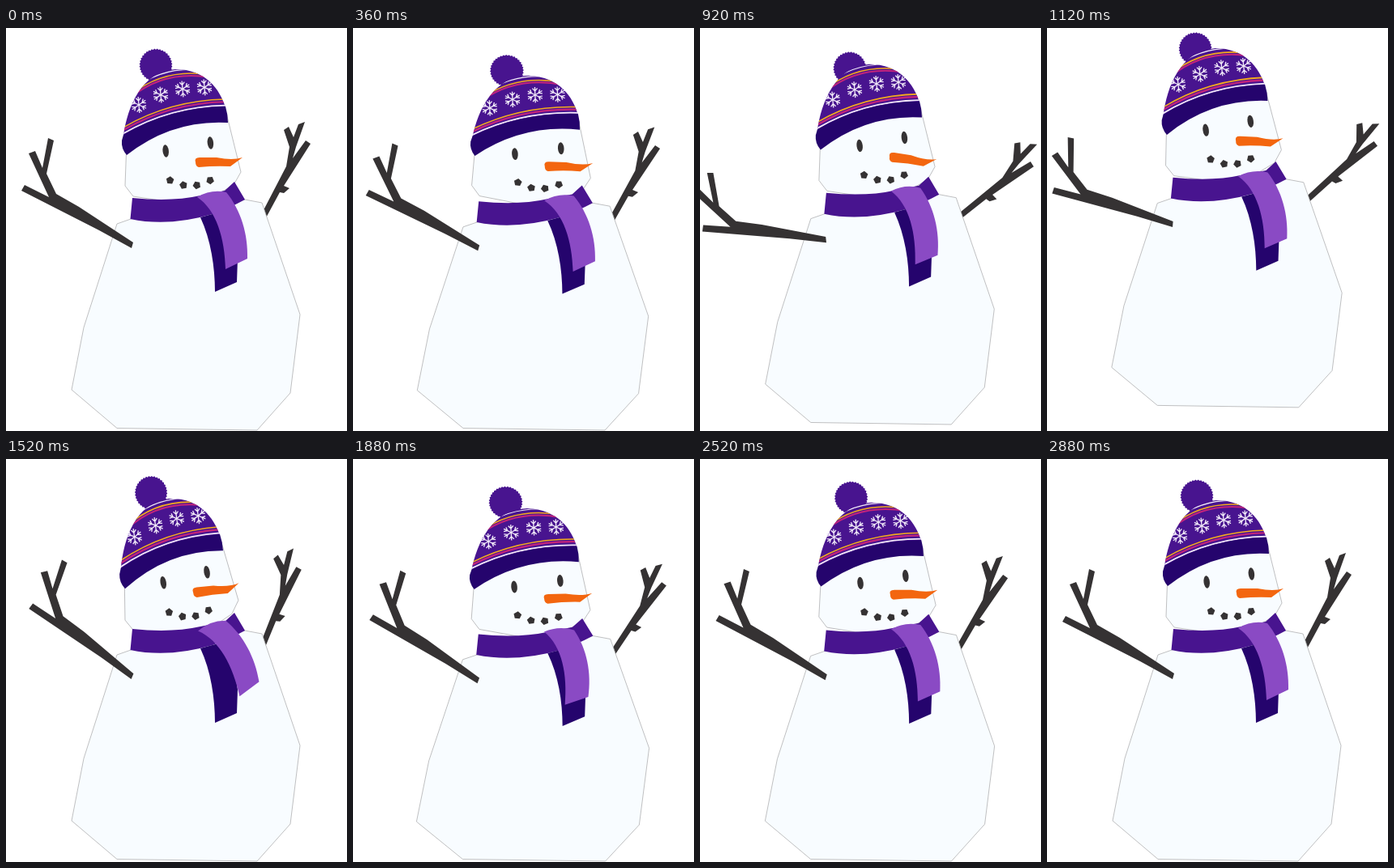
These frames come from a looping animation (421 by 498 pixels, 2920 ms). An HTML page with a canvas:

```html
<!DOCTYPE html>
<html lang="en">
<head>
<meta charset="utf-8">
<title>Jumping snowman</title>
<style>
html, body { margin: 0; width: 100%; height: 100%; overflow: hidden; background: #fff; }
canvas { display: block; width: 421px; height: 498px; }
</style>
</head>
<body>
<canvas id="stage"></canvas>
<script>
const W = 421, H = 498, LOOP = 2920, STEP = 40;
const TAKEOFF = 880, FLING = 980, LAND = 1520, REST = 2880;
const canvas = document.getElementById('stage');
const ctx = canvas.getContext('2d');
const dpr = window.devicePixelRatio || 1;
canvas.width = W * dpr;
canvas.height = H * dpr;

const SNOW = '#f8fcff', EDGE = '#b0b0b2', COAL = '#353233', CARROT = '#f3660f';
const PURPLE = '#48148f', DEEP = '#25046d', LILAC = '#8a4ac4';
const YELLOW = '#f6ab1c', PINK = '#c4247c', PALE = '#f3ecfa';

const ramp = (t, a, b) => Math.min(1, Math.max(0, (t - a) / (b - a)));
const ease = (t, a, b) => (1 - Math.cos(Math.PI * ramp(t, a, b))) / 2;

// Crouch, leap with the arms flung out, then a damped wobble after landing
function pose(t) {
  const crouch = ease(t, 0, 600) - ease(t, 760, TAKEOFF + 20);
  const v = ramp(t, TAKEOFF, LAND);
  const air = 4 * v * (1 - v);
  const fling = ease(t, 760, FLING);
  const back = ramp(t, FLING, LAND);

  const u = ramp(t, LAND, REST);
  const wave = Math.cos(Math.PI * (REST - LAND) * u / 360);
  const decay = Math.exp(-1.1 * u) * (1 - u ** 8);
  const swing = wave * decay;

  const lift = -30 * air;
  const stretch = 1 - .023 * crouch - .011 * air
    + decay * (.027 * u - .019 * (1 - wave));
  const squash = 1 - stretch;
  const tilt = 4.4 * crouch - 2.9 * ease(t, TAKEOFF, LAND) * swing;
  const left = -crouch + (34 * (1 - (1 - back) ** 2) - 27 * fling) * decay ** 2;
  return {
    lift, stretch, tilt, left,
    right: crouch + (28 * fling - 34 * back) * swing,
    tail: (4 * fling - 15 * ease(t, FLING, LAND)) * swing * decay,
    headY: 191 + lift * 1.03 + squash * 250,
    headStretch: 1 - tilt * .0075 - squash * .8,
    pom: -.45 * left,
    nose: -.4 * left - 100 * squash
  };
}

function fill(d, color) {
  ctx.fillStyle = color;
  ctx.fill(new Path2D(d));
}

function line(d, color, width) {
  ctx.strokeStyle = color;
  ctx.lineWidth = width;
  ctx.stroke(new Path2D(d));
}

// Draws around a pivot that has moved by dx, dy
function around(x, y, { dx = 0, dy = 0, deg = 0, sx = 1, sy = 1 }, draw) {
  ctx.save();
  ctx.translate(x + dx, y + dy);
  ctx.rotate(deg * Math.PI / 180);
  ctx.scale(sx, sy);
  ctx.translate(-x, -y);
  draw();
  ctx.restore();
}

function inBody(p, draw) {
  around(222, 496, { dy: p.lift, sx: 1 + (1 - p.stretch) * .8, sy: p.stretch }, draw);
}

function inHead(p, draw) {
  around(227.5, 191, {
    dx: p.tilt * .5, dy: p.headY - 191, deg: p.tilt,
    sx: 1 + (1 - p.headStretch) * .65, sy: p.headStretch
  }, draw);
}

function snow(d) {
  fill(d, SNOW);
  line(d, EDGE, .8);
}

function polygon(x, y, n, radius, start) {
  ctx.beginPath();
  for (let i = 0; i < n; i++) {
    const a = start + i * 2 * Math.PI / n, r = radius(i);
    ctx.lineTo(x + r * Math.cos(a), y + r * Math.sin(a));
  }
  ctx.closePath();
  ctx.fill();
}

function rightArm() {
  fill('M305 250L346 171L350 147L343 126L349 122L355 135L361 119L369 116L358 147L354 161L370 139L376 143L343 195L350 198L343 204L338 203L311 253Z', COAL);
}

function leftArm() {
  fill('M157 265L155 272L115 250L19 201L23 194L53 209L28 155L36 152L45 173L52 136L59 139L50 180L62 205L90 221Z', COAL);
}

function scarf(p) {
  fill('M156 210Q205 215 240 207L270 201L282 190L295 212Q275 223 255 230Q200 246 153.5 236Z', PURPLE);
  fill('M240 234C253 262 258 295 258 326L285 314L286 285C284 265 275 245 262 228Z', DEEP);
  around(255, 205, { deg: p.tail }, () =>
    fill('M236 209Q253 199 272 203C290 225 299 255 298 285L271 298C270 260 260 225 236 209Z', LILAC));
}

function flake(x, y) {
  around(0, 0, { dx: x, dy: y, deg: -5 }, () => {
    for (let i = 0; i < 6; i++) {
      line('M0 0V-10M-3 -8.5L0 -5L3 -8.5', PALE, 1.3);
      ctx.rotate(Math.PI / 3);
    }
  });
}

// Three parallel stripes: one row of colours, each a little lower
function stripes(curve, list) {
  for (const [y, color, width] of list)
    around(0, 0, { dy: y }, () => line(curve, color, width));
}

function hat(p) {
  ctx.fillStyle = PURPLE;
  polygon(185 - p.tilt * .9, 46 + p.pom, 72, i => i % 2 ? 20.5 : 19.2, 0);
  const dome = 'M145 133C150 98 167 54 209 51C247 51 264 76 271 98Q202 98 145 133Z';
  fill(dome, PURPLE);
  ctx.save();
  ctx.clip(new Path2D(dome));
  stripes('M143 133Q202 98 273 97', [[-9, YELLOW, 1.6], [-5.8, PINK, 2.2], [-1.5, PALE, 1.8]]);
  stripes('M155 80Q196 47 252 56', [[-3, PALE, 1.2], [2, YELLOW, 1.6], [5, PINK, 2]]);
  ctx.restore();
  fill('M145 132Q202 98 271 97Q274 107 274 117Q205 113 149 157Q142 149 143 139Z', DEEP);
  for (let i = 0; i < 4; i++) flake(164 + 27 * i, 95 - 15 * i + 2.6 * i * i);
}

function face(p) {
  ctx.fillStyle = COAL;
  for (const side of [-1, 1]) {
    ctx.beginPath();
    ctx.ellipse(224.8 + 27.6 * side, 147 - 5 * side, 3.7, 7.7, -.12, 0, 7);
    ctx.fill();
  }
  for (let i = -1.5; i < 2; i++)
    polygon(227.3 + 16.5 * i, 195 - 3 * i * i, 5, () => 5, i);
  around(235, 166, { deg: p.nose }, () =>
    fill('M234 166Q232 160 239 160L260 160Q280 164 292 160L277 171Q258 170 238 172Q234 171 234 166Z', CARROT));
}

function draw(t) {
  const p = pose(t);
  ctx.setTransform(dpr, 0, 0, dpr, 0, 0);
  ctx.fillStyle = '#fff';
  ctx.fillRect(0, 0, W, H);
  inBody(p, () => {
    around(310, 247, { deg: p.right }, rightArm);
    snow('M137 242L157 235L295 212L316 216L363 354L351 451L310 497L137 494.5L81 447L96 370Z');
  });
  inHead(p, () => {
    snow('M149 140L147 195L157 208L210 216L250 212L281 194L290 178L272 105L205 108Z');
    face(p);
    hat(p);
  });
  inBody(p, () => {
    scarf(p);
    around(155, 269, { deg: p.left }, leftArm);
  });
}

const start = performance.now();
function tick() {
  const t = (performance.now() - start) % LOOP;
  draw(Math.floor(t / STEP) * STEP);
  requestAnimationFrame(tick);
}
tick();
</script>
</body>
</html>
```
